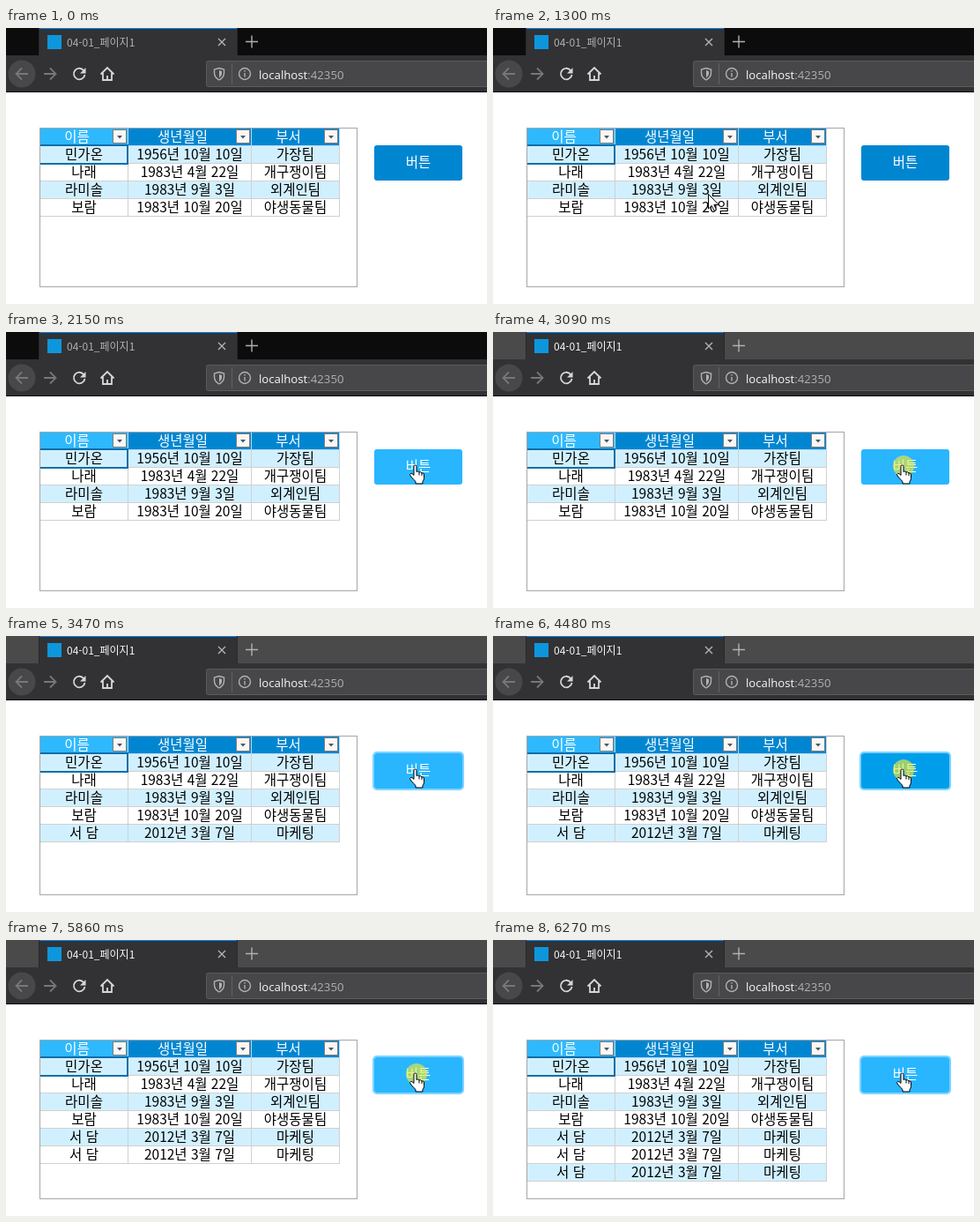
An HTML page for the animation above (7980 ms loop, 546 by 313 pixels).

```html
<!DOCTYPE html>
<html lang="ko">
<head>
<meta charset="utf-8">
<style>
html, body { margin: 0; width: 100%; height: 100%; overflow: hidden; background: #fff; }
svg { display: block; }
text { font: 350 15.5px "Noto Sans CJK KR", "Noto Sans CJK", sans-serif; }
.mid { text-anchor: middle; }
.tab { font-size: 12px; }
.url { font: 13.2px "Open Sans", sans-serif; }
.line { fill: none; stroke: #d7d7db; stroke-width: 1.8; }
.dim { stroke: #77777a; }
.thin { stroke: #b1b1b3; stroke-width: 1.4; }
</style>
</head>
<body>
<svg width="546" height="313" viewBox="0 0 546 313">
  <rect id="bar" width="546" height="31"/>
  <rect y="31" width="546" height="41" fill="#323234"/>
  <rect y="72" width="546" height="1" fill="#0c0c0d"/>
  <rect x="38" width="224" height="32" fill="#323234"/>
  <rect x="38" width="224" height="1" fill="#0a84ff"/>
  <path d="M37.5 0V31M262.5 0V31" stroke="#29292b"/>
  <rect x="47" y="8" width="16" height="16" fill="#0d96dc"/>
  <text id="title" class="tab" x="69" y="20.500">04-01_페이지1</text>
  <path class="line thin" d="M241 12l8 8M249 12l-8 8"/>
  <path class="line thin" d="M272 15.500h14M279 8.500v14"/>

  <circle cx="18" cy="52" r="15.500" fill="#48484a"/>
  <path class="line dim" d="M25 52H12M18 45.500l-6.500 6.500 6.500 6.500"/>
  <path class="line dim" d="M43 52H56M50 45.500l6.500 6.500-6.500 6.500"/>
  <path class="line" d="M88.500 48.500A6.300 6.300 0 1 0 89.500 53"/>
  <path d="M90.500 45v6.500h-6.500z" fill="#d7d7db"/>
  <path class="line" d="M107.500 52.500l7.500-7.500 7.500 7.500M110 51v8h10v-8M115 59v-5"/>

  <rect x="227.500" y="37.500" width="330" height="29" rx="2" fill="#474749" stroke="#5b5b5d"/>
  <path class="line thin" d="M242 45.500l5.500 1.500v4q0 5-5.500 8-5.500-3-5.500-8v-4z"/>
  <path d="M242 48l3 1v3q0 2.500-3 4.500z" fill="#b1b1b3"/>
  <path d="M256.500 40v24" stroke="#626264"/>
  <circle class="line thin" cx="271" cy="52" r="6.500"/>
  <path class="line thin" d="M271 51v4.500M271 48v1.600"/>
  <text class="url" x="287" y="57.500" fill="#f9f9fa">localhost<tspan fill="#b1b1b3">:42350</tspan></text>

  <rect x="38.500" y="113.500" width="360" height="180" fill="#fff" stroke="#a6a6a6"/>
  <g id="grid"></g>
  <path d="M39 133H138V154H39" fill="none" stroke="#0e6ea8" stroke-width="2"/>

  <rect id="ring" x="417" y="132" width="102" height="42" rx="4" fill="none" stroke="#7dd3ff" stroke-width="2"/>
  <rect id="button" x="418" y="133" width="100" height="40" rx="3"/>
  <text class="mid" x="468" y="158" fill="#fff">버튼</text>
  <circle id="spot" cx="466" cy="152" r="12" fill="#e8e83c" opacity=".66"/>
  <path id="arrow" d="M.5.5V17l3.800-3.600 2.700 6 2.500-1.100-2.600-5.900h5.200z" fill="#fff" stroke="#000"/>
  <path id="hand" d="M-1.500 12V2Q-1.500.5 0 .5T1.500 2V8Q3.500 6.500 4.500 8.500 6.500 7.500 7.500 9.500 10 8.500 10 11.500V15Q10 18 8.500 19V21.500H.5V19Q-2 17-5.500 12.500-6.500 10.500-5 10-3.500 9.500-1.500 12zM4.500 8.500V12M7.500 9.500V12.500" fill="#fff" stroke="#000"/>
</svg>
<script>
const LOOP = 7980;
const $ = id => document.getElementById(id);
const columns = [[39, '이름'], [139, '생년월일'], [279, '부서'], [379]];
const extra = ['서 담', '2012년 3월 7일', '마케팅'];
const people = [
  ['민가온', '1956년 10월 10일', '가장팀'],
  ['나래', '1983년 4월 22일', '개구쟁이팀'],
  ['라미솔', '1983년 9월 3일', '외계인팀'],
  ['보람', '1983년 10월 20일', '야생동물팀'],
  extra, extra, extra
];
const added = [3470, 4850, 6270];

// [time, x, y] of the pointer tip
const path = [
  [1000, 534, 218], [1080, 448, 217], [1150, 366, 211], [1230, 293, 200],
  [1300, 244, 188], [1390, 225, 181], [1460, 220, 180], [1770, 238, 178],
  [1850, 294, 172], [1920, 361, 164], [2000, 421, 156], [2080, 453, 152], [2150, 464.5, 150.5]
];

const IDLE = '#0086d1', HOVER = '#29b6ff', DOWN = '#009eea';
// [time, button colour, click spot]
const states = [
  [0, IDLE, 0], [2000, '#0d96e0', 0], [2080, '#1ca8f2', 0], [2150, HOVER, 0],
  [3090, HOVER, 1], [3160, DOWN, 1], [3240, HOVER, 0],
  [4400, HOVER, 1], [4480, DOWN, 1], [4560, '#14aaf5', 0], [4620, HOVER, 0],
  [5860, HOVER, 1], [5950, DOWN, 1], [6020, '#14aaf5', 0], [6100, HOVER, 0]
];

const rect = (x, y, w, h, fill) =>
  `<rect x="${x}" y="${y}" width="${w}" height="${h}" fill="${fill}"/>`;
const label = (x, y, s, fill) => `<text class="mid" x="${x}" y="${y}" fill="${fill}">${s}</text>`;

// A cell with a one pixel line along its right and bottom edges
const cell = (x, y, end, fill, edge) =>
  rect(x, y, end - x, 20, edge) + rect(x, y, end - x - 1, 19, fill);

function header() {
  return columns.slice(0, 3).map(([x, name], i) => {
    const end = columns[i + 1][0], b = end - 18;
    return cell(x, 114, end, i ? '#0086d1' : '#2eb9ff', '#b5d9ec')
      + `<rect x="${b + .5}" y="115.500" width="15" height="15" fill="#f8f8f8" stroke="#7c7c7c"/>`
      + `<path d="M${b + 5} 122h6l-3 3.500z" fill="#555"/>`
      + label((x + end - 17) / 2, 128.5, name, '#fff');
  }).join('');
}

function row(cells, i) {
  const y = 134 + 20 * i;
  return '<g class="row">' + cells.map((s, c) => {
    const x = columns[c][0], end = columns[c + 1][0];
    return cell(x, y, end, i % 2 ? '#fff' : '#d1f0ff', '#d0d0d0')
      + label((x + end - 1) / 2, y + 14.5, s, '#000');
  }).join('') + '</g>';
}

$('grid').innerHTML = header() + people.map(row).join('');
const rows = [...document.querySelectorAll('.row')];

const show = (el, on) => el.setAttribute('visibility', on ? 'visible' : 'hidden');
const latest = (list, t) => list.filter(k => k[0] <= t).pop();

function draw(t) {
  const active = t >= 3090;
  $('bar').setAttribute('fill', active ? '#4b4a4a' : '#0c0c0d');
  $('title').setAttribute('fill', active ? '#f9f9fa' : '#b1b1b3');
  rows.forEach((r, i) => show(r, i < 4 || t >= added[i - 4]));

  const [, colour, spot] = latest(states, t);
  $('button').setAttribute('fill', colour);
  show($('spot'), spot);
  show($('ring'), t >= 3160);

  const tip = latest(path, t);
  const over = tip && tip[0] >= 2000;
  show($('arrow'), tip && !over);
  show($('hand'), over);
  if (tip) for (const id of ['arrow', 'hand'])
    $(id).setAttribute('transform', `translate(${tip[1]} ${tip[2]})`);
}

const start = performance.now();
function tick() {
  draw((performance.now() - start) % LOOP);
  requestAnimationFrame(tick);
}
tick();
</script>
</body>
</html>
```
